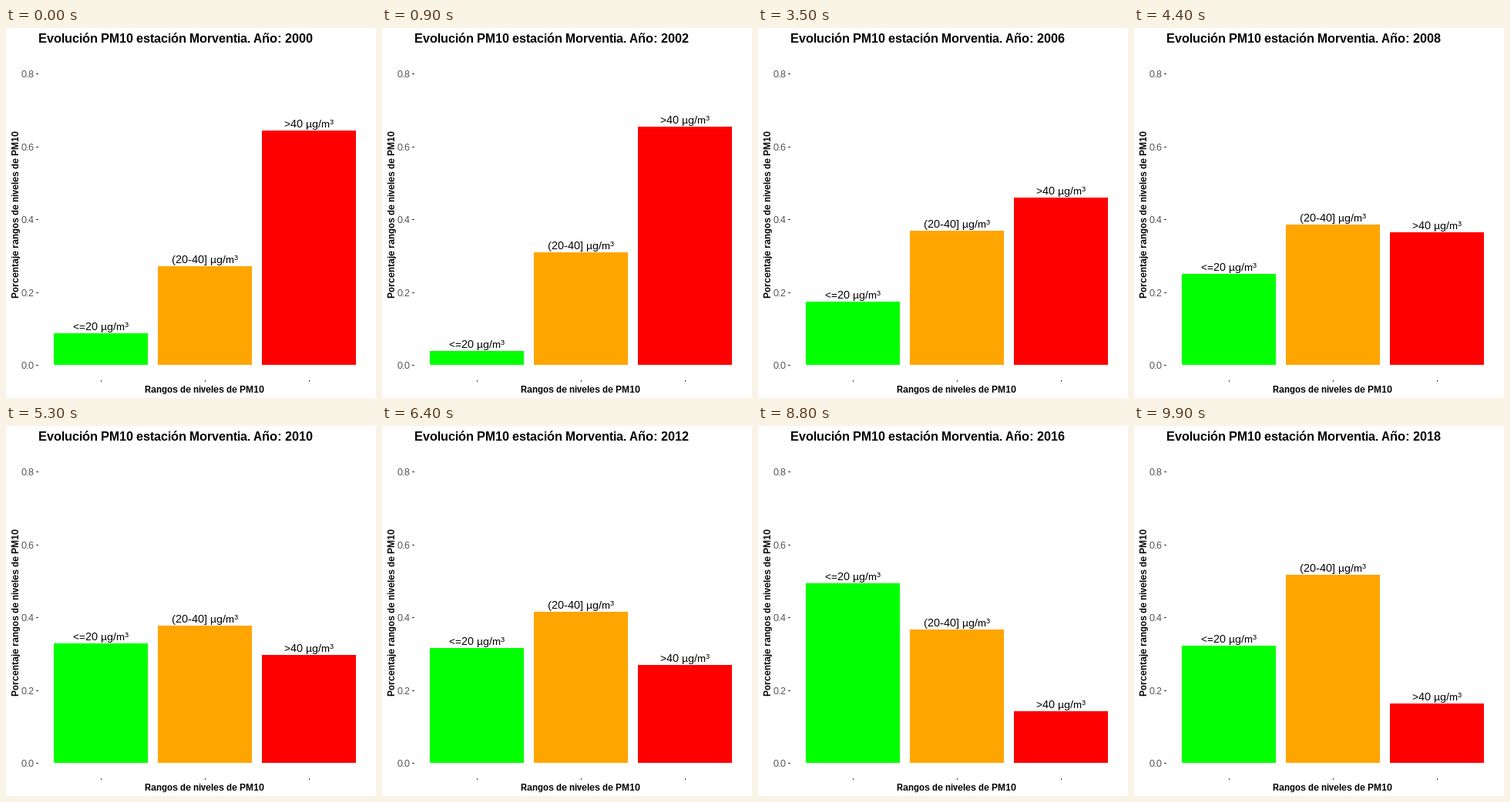
A matplotlib script that plays this animation: 480x480 px, repeating every 10 s.

```python
import numpy as np
import matplotlib.pyplot as plt
from matplotlib.animation import FuncAnimation
from matplotlib.patches import Rectangle

SIZE, DPI = 480, 100
FRAMES, INTERVAL = 100, 100
FIRST, LAST = 2000, 2018
BASE, SCALE = 437, 473  # pixel row of zero, pixels per unit
LEFT, STEP, WIDTH = 62, 135, 122  # bar layout

# Whole-pixel glyph advances keep small text crisp.
plt.rcParams.update({"font.family": "Liberation Sans",
                     "text.hinting": "native", "text.hinting_factor": 1})

# Turning points of the outer ranges; the middle one takes the remainder.
turns = [2000, 2002, 2004, 2007, 2010, 2014, 2016, 2018]
low_key = [.087, .028, .0701, .202, .3451, .2731, .4925, .3215]
high_key = [.643, .655, .6545, .4061, .2813, .2518, .142, .163]

fig = plt.figure(figsize=(SIZE / DPI, SIZE / DPI), dpi=DPI, facecolor="white")
ax = fig.add_axes([0, 0, 1, 1])
ax.set_xlim(0, SIZE)
ax.set_ylim(SIZE, 0)
ax.axis("off")


def text(x, y, s, px, **kw):
    return ax.text(x, y, s, fontsize=px * 72 / DPI, va="baseline", **kw)


def box(x, y, w, h, color):
    return ax.add_patch(Rectangle((x, y), w, h, facecolor=color, lw=0,
                                  antialiased=False))


def shares(year):
    low = np.interp(year, turns, low_key)
    high = np.interp(year, turns, high_key)
    return low, 1 - low - high, high


for k in range(5):
    row = round(BASE + 0.3 - 94.55 * k)
    box(39, row, 3, 1, "#333333")
    text(37, row + 5, f"{k * 0.2:.1f}", 12, ha="right", color="#4d4d4d")

title = text(42, 19, "", 16, weight="bold")
text(257.5, 473, "Rangos de niveles de PM10", 12, ha="center", weight="bold")
text(17, 241, "Porcentaje rangos de niveles de PM10", 12, ha="center",
     weight="bold", rotation=90, rotation_mode="anchor")

ranges = {"<=20 µg/m³": "#00ff00",
          "(20-40] µg/m³": "#ffa500",
          ">40 µg/m³": "#ff0000"}
bars, labels = [], []
for k, (name, color) in enumerate(ranges.items()):
    x = LEFT + STEP * k
    mid = x + WIDTH // 2
    box(mid, 457, 1, 2, "#333333")
    bars.append(box(x, BASE, WIDTH, 0, color))
    labels.append(text(mid, BASE, name, 14, ha="center"))


def update(i):
    year = FIRST + (LAST - FIRST) * i / (FRAMES - 1)
    title.set_text(f"Evolución PM10 estación Morventia. Año: {round(year)}")
    for bar, label, share in zip(bars, labels, shares(year)):
        top = BASE - round(SCALE * share)
        bar.set_y(top)
        bar.set_height(BASE - top)
        label.set_y(top - 4)
    return [title, *bars, *labels]


anim = FuncAnimation(fig, update, frames=FRAMES, interval=INTERVAL,
                     repeat=True, repeat_delay=0, blit=False)
plt.show()
```
